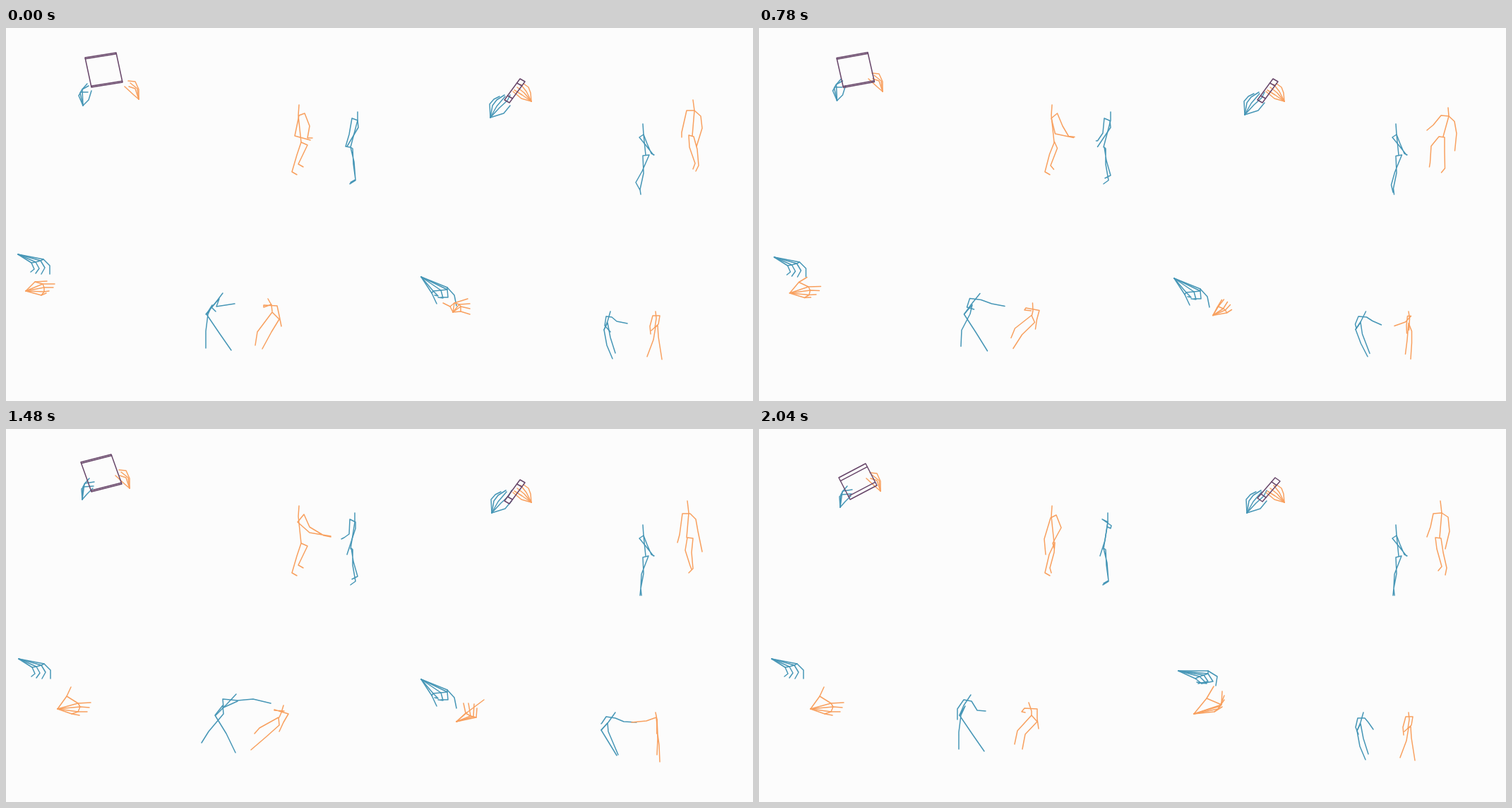
These frames come from a looping animation (1058 px wide and 529 px high, 2.08 s). An HTML page with a canvas:

```html
<!DOCTYPE html>
<html lang="en">
<head>
<meta charset="utf-8">
<title>Paired motion skeletons</title>
<style>
html, body { margin: 0; width: 100%; height: 100%; overflow: hidden; background: #fcfcfc; }
canvas { display: block; }
</style>
</head>
<body>
<canvas id="stage" width="1058" height="529"></canvas>
<script>
const ctx = document.getElementById('stage').getContext('2d');
const BLUE = '#4696b6', ORANGE = '#f8a05f', PURPLE = '#68476a';
const LOOP = 2080, STEP = 30;
const keys = [0, 240, 540, 1020, 1470, 1800, 2040];
const shapes = [];
const mix = (a, b, u) => a + (b - a) * u;

// Moves between poses; order names the pose held at each key time.
const track = (order, ...poses) => t => {
  let k = 0;
  while (k < keys.length - 2 && t >= keys[k + 1]) k++;
  const u = Math.min(1, (t - keys[k]) / (keys[k + 1] - keys[k]));
  const to = poses[order[k + 1]];
  return poses[order[k]].map((v, i) => mix(v, to[i], u));
};
const still = p => () => p;

function stroke(ink, p, closed) {
  ctx.strokeStyle = ink;
  ctx.beginPath();
  for (let i = 0; i < p.length; i += 2) ctx.lineTo(p[i], p[i + 1]);
  if (closed) ctx.closePath();
  ctx.stroke();
}

const line = (ink, path) => shapes.push(t => stroke(ink, path(t)));

// Finger points are offsets from the wrist; joints gives the points per finger.
function hand(ink, web, joints, wrist, fingers) {
  shapes.push(t => {
    const w = wrist(t), p = fingers(t).map((v, i) => v + w[i % 2]), knuckles = [];
    for (const n of joints) {
      const ray = p.splice(0, n * 2);
      knuckles.push(ray[0], ray[1]);
      stroke(ink, [...w, ...ray]);
    }
    if (web) stroke(ink, knuckles);
  });
}

// A parallelogram from three corners, with two inset lines along its u direction.
function box(corners, inset) {
  shapes.push(t => {
    const [ax, ay, bx, by, dx, dy] = corners(t), [s] = inset(t);
    const cx = bx + dx - ax, cy = by + dy - ay;
    stroke(PURPLE, [ax, ay, bx, by, cx, cy, dx, dy], true);
    for (const u of [s, 1 - s])
      stroke(PURPLE, [mix(ax, dx, u), mix(ay, dy, u), mix(bx, cx, u), mix(by, cy, u)]);
  });
}

// Top left: hands on the square box
hand(BLUE, false, '2233',
  track('0123456', [109,110], [110,104], [112,103], [109,103], [108,100], [111,105], [115,111]),
  track('0000111',
    [8,-8,12,-21, -1,-23,6,-31, -4,-18,-1,-23,8,-28, -6,-14,-3,-19,7,-19],
    [7,-8,15,-16, 3,-22,10,-30, 1,-18,4,-23,17,-25, -1,-15,2,-18,16,-19]));
hand(ORANGE, false, '2322',
  track('0122334', [188,101], [183,91], [175,90], [175,84], [172,88]),
  still([-7,-6,-20,-18, 0,-14,-5,-25,-15,-26, -2,-15,-12,-23, -5,-15,-14,-18]));
box(track('0001234', [112,42,156,35,121,84], [108,43,152,34,118,85], [106,47,149,36,121,89],
  [109,60,150,43,127,95], [113,69,151,49,129,100]),
  track('0000011', [.04], [.15]));

// Top left pair
line(ORANGE, still([415,109,414,124,418,162]));
line(ORANGE, track('0001123',
  [431,159,409,153,415,124,423,121,430,139,427,156,434,156],
  [460,152,430,147,413,132,422,121,430,139,450,151,460,153],
  [410,178,408,152,413,124,421,121,418,145,411,172,407,178],
  [406,178,404,156,413,126,421,122,428,140,416,162,418,169]));
line(ORANGE, track('0001011',
  [412,208,405,204,412,180,418,162,427,166,414,193,421,197],
  [412,208,405,204,411,178,419,161,418,175,412,197,414,204]));
line(BLUE, track('0000111', [498,119,498,131,488,169], [494,119,494,132,488,170]));
line(BLUE, track('0001223',
  [487,169,481,168,486,151,490,128,498,131,499,141,483,168],
  [468,151,478,152,488,147,488,128,496,132,497,141,476,169],
  [475,156,479,154,486,149,487,128,495,132,495,141,483,178],
  [494,139,498,141,499,137,486,128,494,132,490,158,483,180]));
line(BLUE, track('0111110',
  [487,221,495,216,493,190,488,169,491,171,492,193,495,215,488,219],
  [490,213,498,209,492,188,489,169,491,171,491,193,495,216,488,221]));

// Top right: hands on the narrow box
hand(BLUE, false, '33232', track('0011233', [686,127], [688,123], [688,119], [691,119]),
  still([-1,-19,5,-26,13,-30, 3,-17,9,-25,20,-32, 9,-16,21,-30, 13,-14,24,-24,28,-32, 19,-6,28,-17]));
hand(ORANGE, false, '32222', still([744,104]),
  still([-1,-12,-4,-20,-11,-25, -7,-14,-15,-24, -10,-12,-20,-20, -13,-9,-24,-16, -14,-4,-26,-14]));
box(track('0000011', [728,72,735,76,706,102], [731,69,738,74,706,98]), still([.2]));

// Top right pair
line(BLUE, still([902,136,903,151,906,180]));
line(BLUE, still([917,180,906,166,897,155,903,151,908,164,914,178,918,180]));
line(BLUE, track('0001111',
  [898,230,892,219,901,203,911,180,902,181,903,206,898,229,899,236],
  [898,236,899,226,900,206,910,180,902,182,903,205,899,226,900,236]));
line(ORANGE, track('0012333', [973,102,975,117,972,153], [973,110,975,122,971,153],
  [979,116,979,128,967,155], [965,102,967,119,964,154]));
line(ORANGE, track('0012344',
  [957,155,957,148,964,117,975,117,984,125,986,142,978,168],
  [940,147,947,138,963,122,975,122,984,129,994,144,1006,170],
  [952,143,963,137,969,126,979,128,986,136,982,155,965,178],
  [951,161,954,150,958,120,969,120,977,128,980,145,986,174],
  [946,153,951,139,955,120,967,119,976,125,978,145,972,170]));
line(ORANGE, track('0012133',
  [973,200,976,192,968,169,967,152,974,154,979,172,981,195,977,203],
  [971,199,969,194,962,172,965,154,973,155,971,175,973,198,967,204],
  [928,195,932,188,942,163,961,154,969,155,971,175,970,200,966,206],
  [962,201,967,195,960,170,958,154,966,155,969,175,974,197,972,207]));

// Bottom left hands
hand(BLUE, true, '3333', track('0123444', [17,321], [23,324], [24,326], [19,324], [18,326]),
  still([36,7,45,16,45,28, 32,9,38,19,33,28, 25,11,30,20,25,27, 19,12,23,21,18,25]));
hand(ORANGE, true, '22222', track('0012343', [28,373], [33,369], [54,383], [73,397], [76,395]),
  track('0001111',
    [13,-13,30,-14, 24,-10,41,-10, 26,-5,39,-5, 26,1,33,0, 22,6,29,3],
    [13,-18,19,-31, 29,-8,47,-9, 32,-3,45,-2, 29,4,42,4, 20,7,31,9]));

// Bottom left pair
line(BLUE, track('0312132', [307,376,295,392,283,406], [326,376,312,391,297,406],
  [300,377,290,392,284,406], [318,376,309,389,295,406]));
line(BLUE, track('0123243',
  [297,402,291,396,302,384,302,384,298,395,324,391],
  [322,390,297,396,307,383,320,384,325,384,342,383],
  [328,386,308,395,307,383,328,385,350,383,375,389],
  [281,412,281,397,290,384,301,386,309,399,321,400],
  [308,403,307,392,302,384,319,384,334,395,344,399]));
line(BLUE, track('0120110',
  [283,454,283,430,286,406,292,393,284,406,303,434,319,457],
  [277,445,287,429,308,404,307,392,296,406,312,432,325,459],
  [289,449,291,427,312,405,312,392,297,406,313,432,328,459]));
line(ORANGE, track('0123223', [371,384,376,393,377,402], [382,387,382,400,380,405],
  [393,392,390,402,387,409], [382,388,386,400,386,406]));
line(ORANGE, track('0123223',
  [376,392,365,396,365,393,384,394,387,408,390,423],
  [384,398,375,399,375,395,393,401,382,413,381,418],
  [394,400,380,399,380,398,400,404,393,416,387,429],
  [377,402,372,401,376,396,394,397,394,411,396,425]));
line(ORANGE, track('0123243',
  [353,450,356,431,377,403,387,413,376,431,363,455],
  [347,448,355,429,380,405,381,415,374,437,367,461],
  [352,432,359,424,386,409,387,420,368,437,347,455],
  [362,447,366,428,386,406,394,415,377,433,373,454],
  [364,433,366,431,390,409,395,421,370,433,365,454]));

// Bottom right hands
hand(BLUE, true, '33332', track('0011123', [588,353], [588,355], [588,352], [594,343]),
  track('0000011',
    [37,15,47,26,50,41, 37,18,38,29,28,29, 28,19,31,30,24,29, 17,20,24,27,19,26, 15,23,22,38],
    [42,0,55,8,53,21, 42,4,49,15,33,18, 36,6,42,15,28,18, 30,8,40,18,26,16, 24,11,33,18]));
hand(ORANGE, true, '22222',
  track('0123345', [633,403], [638,401], [648,400], [638,415], [628,410], [616,404]),
  track('0001112',
    [-4,-8,-14,-13, 2,-13,21,-19, 9,-11,24,-12, 11,-8,24,-5, 11,-1,24,3],
    [15,-13,39,-31, 13,-12,10,-26, 20,-8,17,-26, 24,-7,25,-25, 28,-6,29,-19],
    [18,-22,28,-39, 39,-13,40,-32, 37,-11,43,-26, 34,-7,43,-20, 29,-3,40,-10]));

// Bottom right pair
line(BLUE, track('0110110', [856,402,852,416,847,428], [863,402,853,416,843,427]));
line(BLUE, track('0112112',
  [856,431,848,422,850,409,858,410,865,416,880,419],
  [843,418,844,417,850,408,863,410,875,415,893,416],
  [849,433,845,423,848,410,858,410,863,416,870,426]));
line(BLUE, track('0120220',
  [859,469,851,450,847,428,852,418,856,439,863,461],
  [858,468,850,447,844,427,852,417,853,428,875,461],
  [865,463,854,445,843,427,852,417,853,429,867,462]));
line(ORANGE, track('0110110', [920,402,921,412,919,425], [920,402,922,412,922,432]));
line(ORANGE, track('0110110',
  [913,434,912,423,916,408,926,408,924,420,914,429],
  [922,432,922,420,921,409,921,409,907,414,886,416]));
line(ORANGE, track('0123220',
  [908,466,917,442,920,424,923,422,924,438,929,470],
  [912,470,920,445,923,425,923,430,918,450,915,462],
  [922,462,923,440,922,412,923,433,925,448,926,472],
  [909,463,913,445,918,425,926,427,924,445,920,467]));

function frame(now) {
  let t = now % LOOP;
  t = t < 60 ? 0 : t - t % STEP;
  ctx.fillStyle = '#fcfcfc';
  ctx.fillRect(0, 0, 1058, 529);
  ctx.lineWidth = 1.5;
  ctx.lineJoin = ctx.lineCap = 'round';
  shapes.forEach(draw => draw(t));
  requestAnimationFrame(frame);
}
frame(0);
</script>
</body>
</html>
```
